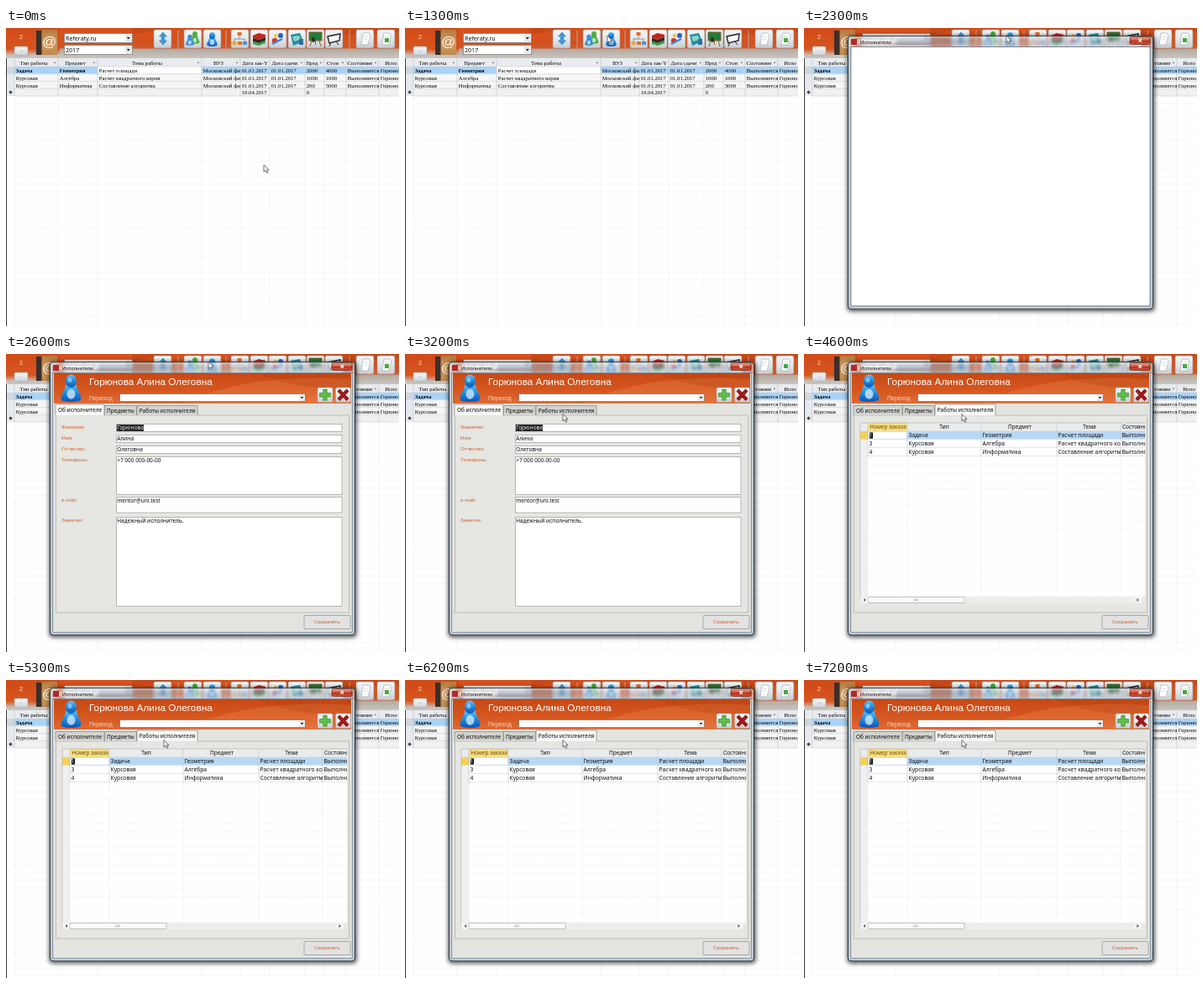
An HTML page that plays this animation: 468x355 px, repeating every 7.3 s.

```html
<!DOCTYPE html>
<html lang="ru">
<head>
<meta charset="utf-8">
<style>
html, body { margin: 0; width: 100%; height: 100%; overflow: hidden; background: #fff; }
svg { display: block; width: 468px; height: 355px; }
text { white-space: pre; }
.serif { font-family: "Liberation Serif", serif; font-size: 6.65px; fill: #000; }
.sans { font-family: "Noto Sans", "Open Sans", sans-serif; font-size: 6.5px; fill: #0c0c0c; }
.arial { font-family: "Liberation Sans", sans-serif; }
</style>
</head>
<body>
<svg id="stage" viewBox="0 0 468 355" xmlns="http://www.w3.org/2000/svg"></svg>
<script>
const LOOP = 7300;
const PERSON = ['Горюнова', 'Алина', 'Олеговна'];
const PHONE = '+7 000 000-00-00';
const MAIL = 'mentor@uni.test';

const rect = (x, y, w, h, fill, more = '') =>
  `<rect x="${x}" y="${y}" width="${w}" height="${h}" fill="${fill}" ${more}/>`;
const path = (d, fill, more = '') => `<path d="${d}" fill="${fill}" ${more}/>`;
const line = (d, color, w = 1, more = '') =>
  `<path d="${d}" fill="none" stroke="${color}" stroke-width="${w}" ${more}/>`;
const dot = (x, y, rx, ry, fill, more = '') =>
  `<ellipse cx="${x}" cy="${y}" rx="${rx}" ry="${ry}" fill="${fill}" ${more}/>`;
const text = (x, y, s, cls = 'sans', style = '') =>
  `<text x="${x}" y="${y}" class="${cls}" style="${style}">${s}</text>`;
const mid = 'text-anchor:middle;';
const down = (x, y, r, fill) => path(`M${x - r} ${y}h${2 * r}l${-r} ${r * 1.2}z`, fill);
const box = (x, y, w, h, fill = '#fff', stroke = '#a9a9a4') =>
  rect(x + .5, y + .5, w - 1, h - 1, fill, `stroke="${stroke}" stroke-width=".8"`);
const clip = (id, x, y, w, h) => `<clipPath id="${id}">${rect(x, y, w, h, '#000')}</clipPath>`;
const grad = (id, ...stops) =>
  `<linearGradient id="${id}" x2="0" y2="1">` +
  stops.map(([o, c, a = 1]) => `<stop offset="${o}" stop-color="${c}" stop-opacity="${a}"/>`).join('') +
  '</linearGradient>';

const defs = `<defs>
${grad('bar', [0, '#d8501c'], [.5, '#d4521f'], [.66, '#cf5a2a'], [.71, '#b5aca4'], [1, '#c9c5bf'])}
${grad('left', [0, '#cf4a18'], [.7, '#d8551f'], [.8, '#cf8a68'], [.9, '#c6beb7'], [1, '#cbc7c2'])}
${grad('key', [0, '#f4f7f9'], [.5, '#e3e8eb'], [1, '#c6ccd1'])}
${grad('tan', [0, '#b9793f'], [.5, '#cf9c62'], [1, '#c08a4f'])}
${grad('glass', [0, '#eef3f7', .4], [.45, '#b9c6d2', .45], [1, '#d3dce4', .55])}
${grad('close', [0, '#e6a696'], [.48, '#cf5a41'], [.5, '#b52c14'], [1, '#d9583a'])}
${grad('head', [0, '#c84914'], [.55, '#d5561f'], [1, '#de6a35'])}
${grad('blue', [0, '#5fc0f5'], [.5, '#1e88dd'], [1, '#0c55b4'])}
${clip('titleClip', 53, 10, 362, 13)}
${clip('gridClip', 67, 82, 339, 215)}
${clip('headClip', 57, 23, 354, 36)}
<filter id="blur"><feGaussianBlur stdDeviation="1.8"/></filter>
<filter id="soft" x="-10%" y="-10%" width="120%" height="120%"><feGaussianBlur stdDeviation="2.6"/></filter>
</defs>`;

function buddy(x, y, s, fill) {
  return `<g transform="translate(${x} ${y}) scale(${s})">` +
    path('M-10 14C-13 8 -6 4 -6 -3H6C6 4 13 8 10 14Q0 17 -10 14z', fill) +
    dot(0, -7, 6, 7, fill) + dot(0, 7, 4.5, 5.5, '#cfe9fa', 'opacity=".8"') + '</g>';
}

function toolbar() {
  let s = rect(0, 0, 468, 36, 'url(#bar)') + rect(0, 0, 64, 36, 'url(#left)');
  s += path('M150 0H468V5Q380 12 300 3T150 8z', '#a93a10', 'opacity=".35"');
  s += text(18, 13, '2', 'arial', mid + 'font-size:8px;fill:#ffe0b0');
  s += rect(10, 22, 16, 11, 'url(#key)', 'rx="1.5" stroke="#a7a09a" stroke-width=".6"');
  s += text(18, 28, '...', 'arial', mid + 'font-size:6px;fill:#777');
  s += rect(36, 3, 7, 29, '#3b2f2a') + rect(42.5, 2, 18.5, 30, 'url(#tan)');
  s += text(51.7, 22, '@', 'arial', mid + 'font-size:17px;fill:#fff8ee');
  [['Referaty.ru', 6], ['2017', 20]].forEach(([t, y]) => {
    s += box(69, y, 82, 12, '#fff', '#7d7a78') + rect(142, y + 1.5, 7.5, 9, '#e4e6e8');
    s += text(71, y + 8.5, t, 'sans', 'font-size:7.1px') + down(145.8, y + 5, 2, '#222');
  });
  [176, 212, 235, 268, 291, 313, 336, 358, 380, 417, 442].forEach(x => {
    s += rect(x, 2, 21, 22, 'url(#key)', 'rx="2" stroke="#9b8d86" stroke-width=".6"');
  });
  s += line('M205 3V28M262 3V28M409 3V28', '#b9a79d', 1);
  s += path('M187 5l4.5 5h-2.7v5h2.7l-4.5 5l-4.5 -5h2.7v-5h-2.7z', '#3a9be0', 'stroke="#1c6cab" stroke-width=".5"');
  s += buddy(225, 11, .5, '#4bae3c') + buddy(219, 14, .45, '#3b8fd6') + buddy(245.5, 13, .58, 'url(#blue)');
  s += line('M278 8V13M272 17V13H284V17', '#7d7d7d', .8) + rect(275.5, 5, 5, 4, '#e2702a') +
    rect(269.5, 16, 5, 4, '#f0a33a') + rect(276, 16, 5, 4, '#e2702a') + rect(282, 16, 5, 4, '#4f94d4');
  s += path('M294 9l7 -3l8 2v3l-8 3l-7 -2z', '#c3281d') + path('M294 12l7 2l8 -3v4l-8 3l-7 -2z', '#2b2b2b') +
    path('M294 16l7 2l8 -3v3l-8 3l-7 -2z', '#3d9b3a');
  s += dot(320, 15, 3.2, 3, '#d8372c') + dot(327, 9, 3, 3, '#2b62c4') +
    line('M317 19L329 13', '#3f83d0', 2.5) + dot(321, 9, 2.2, 2, '#f0c23b');
  s += path('M339 8l11 -2l4 10l-12 5z', '#1f8ea3') + path('M341 10l8 -1l2 5l-8 2z', '#8fd1c4') + rect(349, 13, 5, 7, '#2b6f9c');
  s += rect(361, 5, 15, 10, '#1f7d3c', 'stroke="#8a5a2a"') + line('M364 15l-2 7M373 15l2 7M368.5 15v5', '#8a5a2a', 1) + dot(366, 14, 2, 3, '#2e2e2e');
  s += path('M383 10l15 -3l-1 8l-12 3z', '#fafafa', 'stroke="#222" stroke-width="1.4"') + line('M387 17l-2 5M393 16l3 4', '#222', 1);
  [428, 453].forEach(x => {
    s += path(`M${x - 3} 6h7l2 3l-3 11h-8z`, '#fff', 'stroke="#a8adb0" stroke-width=".7"');
    s += line(`M${x - 2} 10h5M${x - 2.5} 13h5`, '#c3c9cd', .7);
  });
  return s + rect(451, 12, 5, 5, '#4aa83f');
}

function mainTable() {
  const cols = [10, 62, 109, 233, 279, 314, 356, 379, 405, 444, 480];
  const heads = ['Тип работы', 'Предмет', 'Тема работы', 'ВУЗ', 'Дата зак-Y', 'Дата сдачи', 'Пред', 'Стои', 'Состояние', 'Испо'];
  const date = '01.01.2017', tail = ['Выполняется', PERSON[0].slice(0, 6)];
  const rows = [
    ['Задача', 'Геометрия', 'Расчет площади', 'Московский фи', date, date, '2000', '4000', ...tail],
    ['Курсовая', 'Алгебра', 'Расчет квадратного корня', 'Московский фи', date, date, '1000', '1000', ...tail],
    ['Курсовая', 'Информатика', 'Составление алгоритма', 'Московский фи', date, date, '200', '5000', ...tail],
    ['', '', '', '', '19.04.2017', '', '0']
  ];
  const top = 46, step = 8.75;
  let s = rect(0, 36, 468, 319, '#fff') + rect(0, 36, 468, 10, '#e9ebee') + rect(1, 46, 9, 35, '#e6e9ed');
  s += rect(10, top, 458, step, '#a9d3f6') + rect(109, top, 124, step, '#fff') + rect(1, top, 9, step, '#cfd6dd');
  s += rect(10, top + step, 458, step * 2, '#f6f6f6') + rect(10, top + 3 * step, 458, step, '#f1f1f2');
  for (let y = top; y < 355; y += step)
    s += line(`M10 ${y.toFixed(2)}H468`, y < 82 ? '#c9ced4' : '#eeeef0', .6, y < 82 ? '' : 'stroke-dasharray="2 1"');
  cols.forEach((x, i) => {
    s += line(`M${x} 36V81`, '#c3c7cc', .7) + line(`M${x} 81V355`, '#e9e9ec', .7, 'stroke-dasharray="2 1"');
    if (i > 9) return;
    const c = i == 9 ? 458.5 : (x + cols[i + 1]) / 2 - (i == 4 ? 0 : 3);
    s += text(c, 43.8, heads[i], 'serif', mid);
    if (i < 9 && i != 4) s += down(cols[i + 1] - 4, 40.8, 1.3, '#555');
  });
  rows.forEach((r, j) => r.forEach((t, i) => {
    if (t) s += text(cols[i] + 1.8, top + 7 + j * step, t, 'serif', j == 0 && i < 2 ? 'font-weight:bold;font-size:6.4px' : '');
  }));
  s += line('M3.5 76.5h4M5.5 74.5v4M4 75l3 3M7 75l-3 3', '#222', .7);
  return s + rect(0, 0, 1, 355, '#3b3b3b');
}

function frame() {
  let s = rect(51, 9, 367, 329, '#000', 'rx="5" opacity=".6" filter="url(#soft)"');
  s += rect(52, 9.5, 364, 325.5, '#b4c1cd', 'rx="4"');
  s += `<g clip-path="url(#titleClip)"><g filter="url(#blur)"><use href="#bar0"/></g></g>`;
  s += rect(53, 10, 362, 13, 'url(#glass)', 'rx="3"');
  s += rect(110, 11, 90, 10, '#5f7488', 'opacity=".25" filter="url(#blur)"');
  s += rect(52.5, 9.8, 363, 325, 'none', 'rx="4" stroke="#2e363d" stroke-width="1.1"');
  s += rect(53.7, 11, 360.6, 322.6, 'none', 'rx="3" stroke="#eef4f9" stroke-width=".7" opacity=".7"');
  s += dot(84, 16.5, 26, 4, '#fff', 'opacity=".55" filter="url(#blur)"');
  s += rect(56, 13, 7, 7, '#b3292d') + text(67, 18.8, 'Исполнители', 'sans', 'font-size:5.6px');
  s += rect(388, 10.4, 24, 9, 'url(#close)', 'rx="1.5" stroke="#5e1f16" stroke-width=".7"');
  s += line('M398.5 13l3.5 3.5M402 13l-3.5 3.5', '#fff', 1.2);
  return s + rect(56, 22.5, 356, 308.5, '#fff', 'stroke="#57626b" stroke-width=".7"');
}

function formBase() {
  let s = rect(56.5, 23, 355, 308, '#e3e3df') + rect(57, 23, 354, 36, 'url(#head)');
  s += `<g clip-path="url(#headClip)">` + path('M210 59Q290 22 411 30V59z', '#ef8a55', 'opacity=".3"') +
    path('M300 23Q350 45 411 40V23z', '#a83a0c', 'opacity=".25"') + '</g>';
  s += buddy(77.5, 40, 1.1, 'url(#blue)') + dot(76, 31, 2.4, 3, '#b9e3fb', 'opacity=".6"');
  s += text(99, 37.2, PERSON.join(' '), 'arial', 'font-size:11.8px;fill:#fff');
  s += text(99, 54.5, 'Переход', 'arial', 'font-size:7px;fill:#f6d9c6');
  s += box(135, 47, 222, 10, '#fff', '#9a6a55') + rect(349, 48.3, 7, 7.4, '#e6e8ea') + down(352.5, 51, 1.8, '#222');
  [371, 392.5].forEach(x => { s += rect(x, 40, 18, 17.5, 'url(#key)', 'rx="1.5" stroke="#a49a92" stroke-width=".6"'); });
  s += line('M380 42V55.5M373.2 48.7H386.8', '#2f8c25', 5) + line('M380 42.7V54.8M373.9 48.7H386.1', '#62c04a', 3.4);
  s += line('M396 43L407 54.5M407 43L396 54.5', '#7f0f0f', 4) + line('M396.5 43.6L406.5 54M406.5 43.6L396.5 54', '#a81a18', 2.4);
  s += rect(59.5, 73, 349, 235, '#e6e6e2', 'stroke="#b3b2ab" stroke-width=".8"');
  s += rect(355, 311.5, 55, 16, '#e2e2e2', 'rx="1" stroke="#9a9a98" stroke-width=".8"');
  return s + text(382.3, 321.4, 'Сохранить', 'sans', mid + 'font-size:5.8px;fill:#cf5522');
}

function tabs(active) {
  return [['Об исполнителе', 59, 58], ['Предметы', 117.5, 38], ['Работы исполнителя', 156, 72]].map(([t, x, w], i) => {
    const on = i == active, y = on ? 60 : 61.5;
    return rect(x, y, w, 73.4 - y, on ? '#f7f7f5' : '#d3d3cf') +
      line(`M${x} 73V${y}H${x + w}V73`, '#8f8e89', .8) +
      text(x + w / 2, on ? 69.2 : 69.6, t, 'sans', mid + 'font-weight:500');
  }).join('');
}

function about() {
  const fields = [['Фамилия:', 83, 10, PERSON[0]], ['Имя:', 96, 10, PERSON[1]], ['Отчество:', 109, 10, PERSON[2]],
    ['Телефоны:', 122, 46, PHONE], ['e-mail:', 170, 19.5, MAIL], ['Заметки:', 194, 107, 'Надежный исполнитель.']];
  return tabs(0) + fields.map(([label, y, h, value], i) =>
    text(66, y + 6, label, 'arial', 'font-size:6.2px;fill:#d0602f') + box(131, y, 269.5, h) +
    (i ? '' : rect(132, 84.2, 32, 7.6, '#111')) +
    text(132.2, y + 7.3, value, 'sans', i ? '' : 'fill:#fff')).join('');
}

function works() {
  const cols = [76, 123, 211, 301, 377];
  const heads = ['Номер заказа', 'Тип', 'Предмет', 'Тема', 'Состояние'];
  const rows = [['1', 'Задача', 'Геометрия', 'Расчет площади', 'Выполняется'],
    ['3', 'Курсовая', 'Алгебра', 'Расчет квадратного корня', 'Выполняется'],
    ['4', 'Курсовая', 'Информатика', 'Составление алгоритма', 'Выполняется']];
  let s = tabs(2) + '<g clip-path="url(#gridClip)">' + rect(67, 82, 339, 207.5, '#fff');
  s += rect(67, 82, 339, 10, '#e9ebed') + rect(76, 82, 47, 10, '#f8df7d') + rect(67, 92, 9, 197, '#eef0f1');
  s += rect(76, 92, 330, 9.5, '#b6d8f4') + rect(67, 92, 9, 9.5, '#f6cf58') + rect(77, 92.6, 45.5, 8.2, '#fff');
  for (let y = 92; y < 289; y += 9.8)
    s += line(`M76 ${y.toFixed(1)}H406`, y < 123 ? '#cfd5da' : '#ececee', .6, y < 123 ? '' : 'stroke-dasharray="2 1"');
  cols.forEach((x, i) => {
    s += line(`M${x} 82V122`, '#c5cad0', .7) + line(`M${x} 122V289`, '#e4e5e8', .7, 'stroke-dasharray="2 1"');
    const c = [100, 167, 257, 340][i];
    s += c ? text(c, 89.2, heads[i], 'sans', mid + (i ? '' : 'fill:#6f4a10')) : text(379, 89.2, heads[i]);
    s += `<clipPath id="col${i}">${rect(x, 82, (cols[i + 1] || 406) - x, 207, '#000')}</clipPath>`;
  });
  s += rect(78, 93.4, 4, 7.2, '#111');
  rows.forEach((r, j) => r.forEach((t, i) => {
    s += `<g clip-path="url(#col${i})">` + text(cols[i] + 1.5, 99.2 + j * 9.8, t, 'sans',
      'font-size:6.7px;' + (i + j ? '' : 'fill:#fff')) + '</g>';
  }));
  s += '</g>' + line('M67 297V82H406', '#b5b5b0', .7);
  s += `<g id="partial">${rect(131, 289, 275, 8, '#fff')}</g><g id="scroll">`;
  s += rect(67, 289, 336, 8, '#ededec') + rect(76, 289.5, 115, 7, '#fafafa', 'rx="1" stroke="#a8aaac" stroke-width=".7"');
  s += rect(67.5, 289.5, 8, 7, '#f3f3f3') + rect(393, 289.5, 9, 7, '#f3f3f3');
  s += path('M73 291v4l-2.4 -2z', '#555') + path('M396.5 291v4l2.4 -2z', '#555');
  return s + line('M131 291.5v3M133 291.5v3M135 291.5v3', '#8a8a8a', .7) + '</g>';
}

const stage = document.getElementById('stage');
stage.innerHTML = defs + mainTable() + `<g id="bar0">${toolbar()}</g>` +
  `<g id="win">${frame()}<g id="form">${formBase()}<g id="about">${about()}</g><g id="works">${works()}</g></g></g>` +
  `<g id="cursor">${path('M0 0V8.4L2 6.7L3.4 9.7L4.9 9.1L3.5 6.1H6z', '#fff', 'stroke="#333" stroke-width=".7"')}` +
  `<circle id="click" r="3.6" fill="#f5b5a5" fill-opacity=".5" stroke="#d3201c" stroke-width="1.3"/></g>`;

const el = {};
['win', 'form', 'about', 'works', 'partial', 'scroll', 'cursor', 'click'].forEach(id => el[id] = document.getElementById(id));
const show = (id, on) => el[id].setAttribute('display', on ? 'inline' : 'none');
const ease = (t, a, b) => {
  const p = Math.min(1, Math.max(0, (t - a) / (b - a)));
  return p * p * (3 - 2 * p);
};

function draw(t) {
  const up = ease(t, 50, 1150), over = ease(t, 2700, 3200);
  const x = 307 - 66 * up - 53 * over, y = 163 - 154 * up + 62.5 * over;
  el.cursor.setAttribute('transform', `translate(${x.toFixed(2)} ${y.toFixed(2)})`);
  show('click', (t >= 1400 && t < 1600) || (t >= 3800 && t < 4200));

  const open = ease(t, 1950, 2250), k = .9 + .1 * open;
  show('win', t >= 2000);
  el.win.setAttribute('opacity', open.toFixed(3));
  el.win.setAttribute('transform', `translate(${234 * (1 - k)} ${172 * (1 - k)}) scale(${k})`);
  show('form', t >= 2500);
  show('about', t < 3900);
  show('works', t >= 3900);
  show('partial', t < 4200);
  show('scroll', t >= 4200);
}

function tick() {
  draw(performance.now() % LOOP);
  requestAnimationFrame(tick);
}
tick();
</script>
</body>
</html>
```
